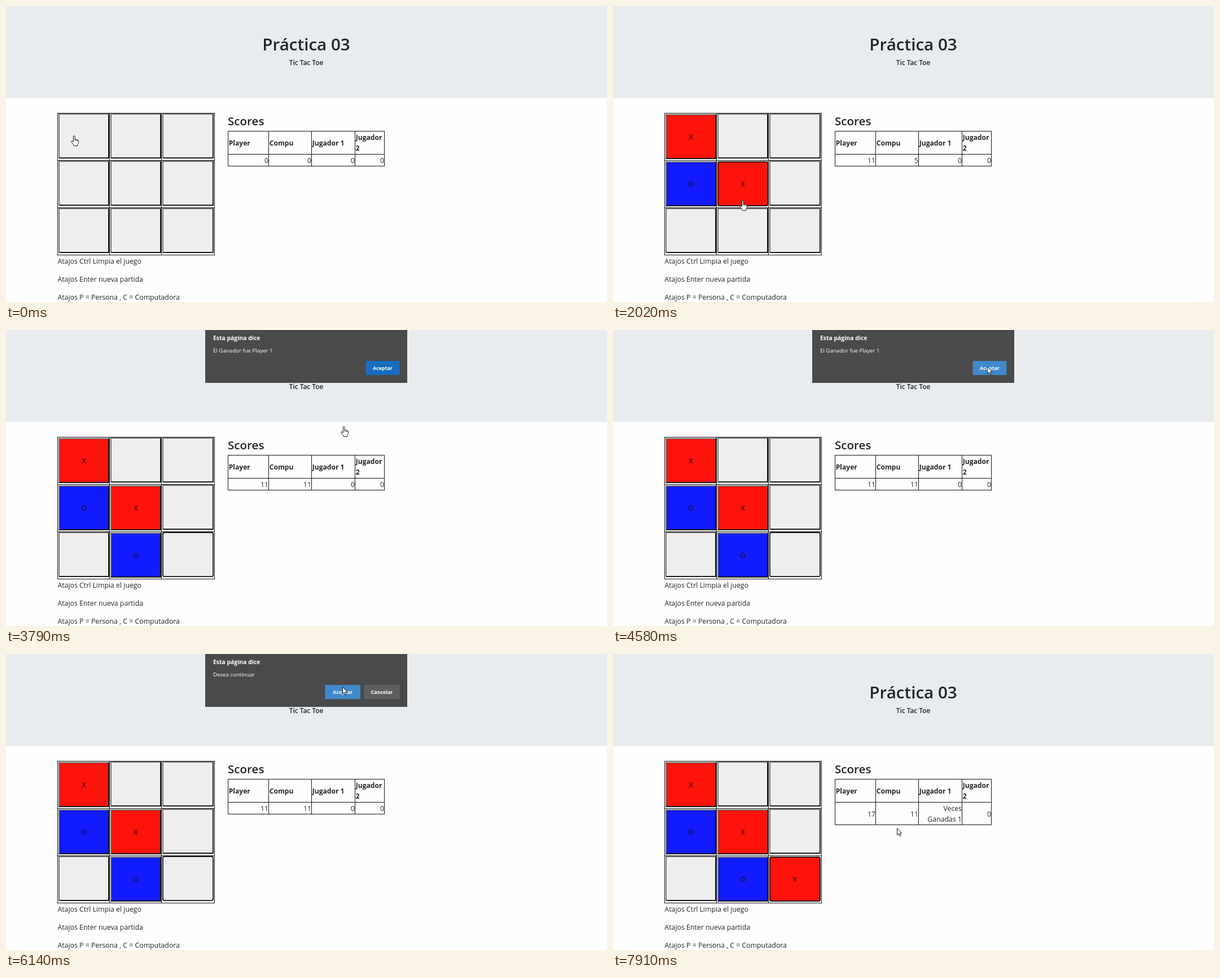
Recreate the animation shown at these times as an HTML page. Size 1065 by 526 pixels, loop 7.99 s.

```html
<!DOCTYPE html>
<html lang="es">
<head>
<meta charset="utf-8">
<title>Tic Tac Toe</title>
<style>
html, body { margin: 0; width: 100%; height: 100%; overflow: hidden; background: #fefefe; }
svg { display: block; width: 100vw; height: 100vh; }
text { font: 12.3px "Open Sans", "Noto Sans", sans-serif; fill: #212529; white-space: pre; }
.h1 { font-size: 29.6px; font-weight: 600; }
.h3 { font-size: 20.6px; font-weight: 600; }
.h6 { font-size: 11.9px; font-weight: 600; }
.b { font-size: 12.1px; font-weight: 700; }
.mark { fill: #111; }
.title { font-size: 10.4px; font-weight: 700; fill: #fff; }
.msg { font-size: 9.7px; fill: #fff; }
.btn { font-size: 8.9px; font-weight: 700; fill: #fff; }
</style>
</head>
<body>
<svg id="stage" viewBox="0 0 1065 526" preserveAspectRatio="none"></svg>
<script>
const LOOP = 7990;
const STEP = 77; // the screen refreshes at about 13 Hz
const svg = document.getElementById("stage");

// Pointer: resting place, then one glide per stop
const REST = { x: 115, y: 230 };
const GLIDES = [
  { from: 230, to: 300, x: 109, y: 221 },
  { from: 700, to: 920, x: 147, y: 301 },
  { from: 1380, to: 2000, x: 224, y: 345 },
  { from: 2000, to: 2400, x: 229, y: 391 },
  { from: 2480, to: 2940, x: 309, y: 391 },
  { from: 3480, to: 3770, x: 593, y: 171 },
  { from: 3960, to: 4540, x: 663, y: 65 },
  { from: 5200, to: 5500, x: 640, y: 102 },
  { from: 5500, to: 5820, x: 596, y: 58 },
  { from: 6440, to: 6900, x: 721, y: 312 },
  { from: 6980, to: 7360, x: 489, y: 283 },
  { from: 7520, to: 7850, x: 503, y: 309 }
];

const ALERT = { open: 3310, close: 5080 };
const CONFIRM = { open: 5340, close: 6150 };
const MOVES = [
  { cell: 0, click: 460, mark: "X" },
  { cell: 3, click: 1250, mark: "O" },
  { cell: 4, click: 1610, mark: "X" },
  { cell: 7, click: 2330, mark: "O" },
  { cell: 8, click: 3080, mark: "X", shown: CONFIRM.close }
];
const FILL = { X: "#fd120c", O: "#111bfd" };

const during = (t, span) => t >= span.open && t < span.close;
const placed = (m, t) => t >= (m.shown || m.click);
const rect = (x, y, w, h, fill, more = "") =>
  `<rect x="${x}" y="${y}" width="${w}" height="${h}" fill="${fill}" ${more}/>`;
const text = (x, y, s, cls = "", anchor = "start") =>
  `<text x="${x}" y="${y}" class="${cls}" text-anchor="${anchor}">${s}</text>`;

// Ruled grid through the given column and row positions
function grid(xs, ys) {
  const [l, r] = [xs[0], xs[xs.length - 1]], [t, b] = [ys[0], ys[ys.length - 1]];
  const d = xs.map(x => `M${x} ${t - .5}V${b + .5}`).join("") +
    ys.map(y => `M${l - .5} ${y}H${r + .5}`).join("");
  return `<path d="${d}" fill="none" stroke="#111"/>`;
}

function pointerAt(t) {
  let { x, y } = REST;
  for (const g of GLIDES) {
    const k = Math.min(1, Math.max(0, (t - g.from) / (g.to - g.from)));
    const e = k * k * (3 - 2 * k);
    x += (g.x - x) * e;
    y += (g.y - y) * e;
  }
  return { x: Math.round(x), y: Math.round(y) };
}

function page() {
  const hints = ["Ctrl Limpia el juego", "Enter nueva partida", "P = Persona , C = Computadora"];
  return rect(0, 0, 1065, 526, "#fefefe") +
    rect(0, 0, 1065, 163.6, "#e9ecef") +
    text(532, 79, "Práctica 03", "h1", "middle") +
    text(532, 105, "Tic Tac Toe", "h6", "middle") +
    text(393, 212, "Scores", "h3") +
    hints.map((s, i) => text(91.5, 458 + 31.8 * i, "Atajos " + s)).join("") +
    grid([91.5, 183.5, 275.5, 369.5], [0, 1, 2, 3].map(i => 190.5 + 84 * i));
}

function cell(i, mark, focused) {
  const col = i % 3, row = Math.floor(i / 3);
  const x = 93 + 92 * col, y = 191 + 84 * row + (mark ? 1 : 0);
  const w = col === 2 ? 91 : 90, h = 80;
  const fill = FILL[mark] || "#eee";
  const label = mark ? text(x + 45, y + 45, mark, "mark", "middle") : "";
  if (focused)
    return rect(x + .9, y + .9, w - 1.8, h - 1.8, fill, 'rx="2.5" stroke="#111" stroke-width="1.8"') + label;
  const bevel = (d, color) => `<path d="${d}" fill="${color}"/>`;
  return rect(x, y, w, h, fill) +
    bevel(`M${x} ${y}h${w}l-2 2h${4 - w}v${h - 4}l-2 2z`, "#767676") +
    bevel(`M${x + w} ${y + h}h${-w}l2 -2h${w - 4}v${4 - h}l2 -2z`, "#1c1c1c") + label;
}

function board(t) {
  const last = MOVES.filter(m => t >= m.click).pop();
  let out = "";
  for (let i = 0; i < 9; i++) {
    const move = MOVES.find(m => m.cell === i && placed(m, t));
    out += cell(i, move && move.mark, last && last.cell === i);
  }
  return out;
}

function scores(t) {
  const points = mark => {
    const n = MOVES.filter(m => m.mark === mark && placed(m, t)).length;
    return n ? 6 * n - 1 : 0;
  };
  const won = t >= CONFIRM.close;
  const cols = [393.5, 465.5, 541.5, 618.5, 670.5];
  const base = won ? 288.5 : 279;
  const head = (i, s, y = 248) => text(cols[i] + 1.2, y, s, "b");
  const num = (i, s, y = base) => text(cols[i + 1] - .5, y, s, "", "end");
  return grid(cols, [222.5, 263.5, won ? 303.5 : 284.5]) +
    head(0, "Player") + head(1, "Compu") + head(2, "Jugador 1") +
    head(3, "Jugador", 238) + head(3, "2", 257) +
    num(0, points("X")) + num(1, points("O")) + num(3, 0) +
    (won ? num(2, "Veces", 279) + num(2, "Ganadas 1", 298) : num(2, 0));
}

function button(x, w, label, fill) {
  return rect(x, 55, w, 25, fill, 'rx="1"') + text(x + w / 2, 70.7, label, "btn", "middle");
}

function dialog(t) {
  const asking = during(t, CONFIRM);
  if (!asking && !during(t, ALERT)) return "";
  const p = pointerAt(t);
  const [x, w] = asking ? [565.5, 62.5] : [637.5, 60];
  const over = p.x >= x && p.x <= x + w && p.y >= 55 && p.y <= 80;
  return rect(353, 0, 358, 94, "#4a4a4a") +
    text(367, 17.5, "Esta página dice", "title") +
    text(367, 39.5, asking ? "Desea continuar" : "El Ganador fue Player 1", "msg") +
    button(x, w, "Aceptar", over ? "#4189cb" : "#176dbf") +
    (asking ? button(634.5, 63, "Cancelar", "#5e5e5e") : "");
}

function pointer(t) {
  const { x, y } = pointerAt(t);
  const hand = "M4.4 11.5V2a1.3 1.3 0 0 1 2.6 0V6.8q1.2-1 2.2.5 1.4-.7 2.1.6 1.9-.5 2.1 1.3V13.5L11.6 16.3V18.5H5.2V16.8L1 11.8Q.2 9.8 2 9.7Z M7 6.8V9.5M9.2 7.3V9.8M11.3 7.9V10.2";
  const arrow = "M.5.6V12.6L3.2 10.1 5.1 14.5 7 13.7 5.1 9.4H8.8Z";
  return `<path transform="translate(${x} ${y})" d="${t < 4000 ? hand : arrow}" fill="#fff" stroke="#1c1c24" stroke-linejoin="round"/>`;
}

const backdrop = page();
let shown = -1;
function draw(time) {
  const t = Math.floor((time % LOOP) / STEP) * STEP;
  if (t === shown) return;
  shown = t;
  svg.innerHTML = backdrop + board(t) + scores(t) + dialog(t) + pointer(t);
}

const start = performance.now();
function tick() {
  draw(performance.now() - start);
  requestAnimationFrame(tick);
}
tick();
</script>
</body>
</html>
```
